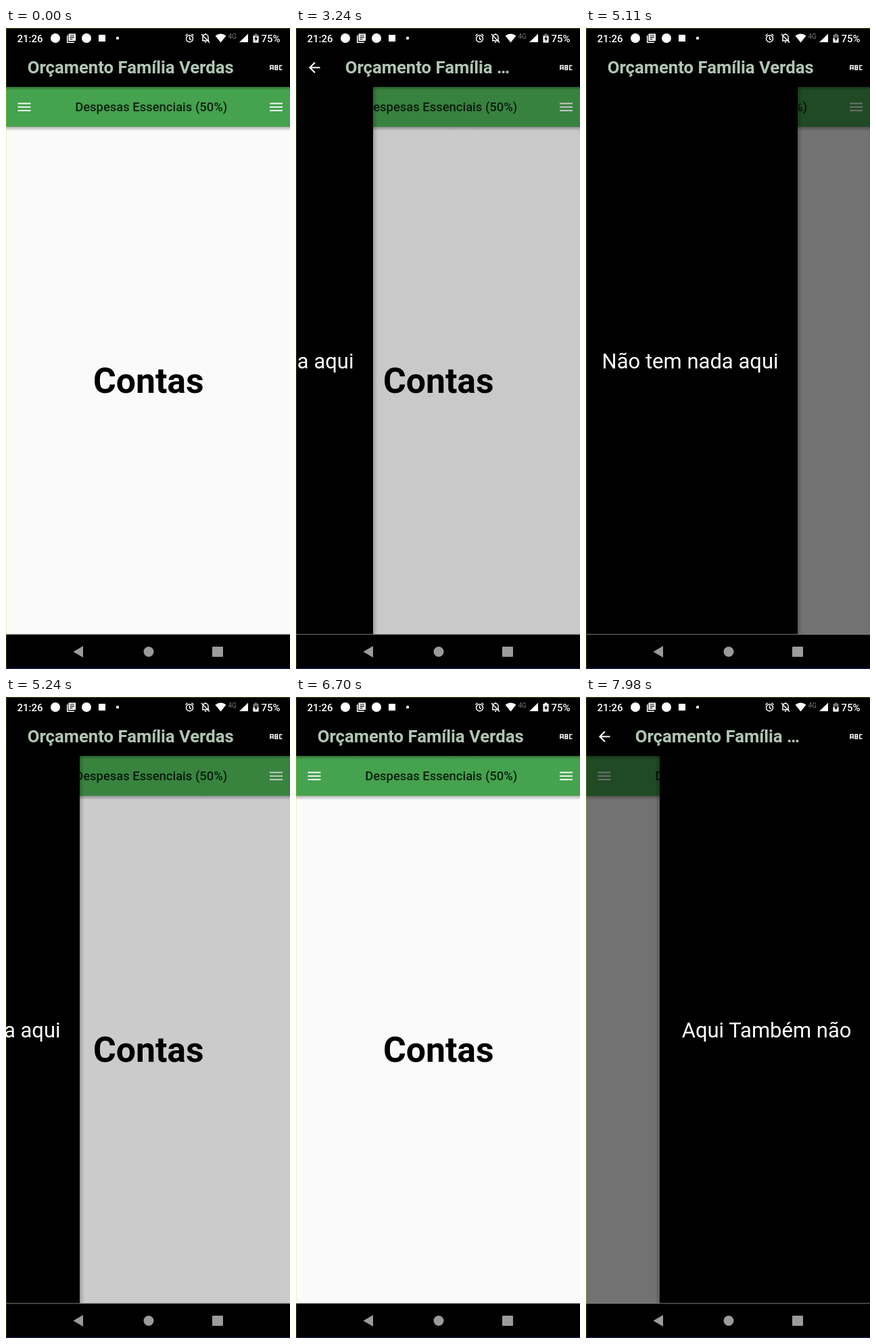
These frames come from a looping animation (420 px wide and 947 px high, 8000 ms). An HTML page:

```html
<!DOCTYPE html>
<html lang="pt">
<head>
<meta charset="utf-8">
<style>
  html, body { margin: 0; width: 100%; height: 100%; overflow: hidden; background: #000; }
  svg { display: block; width: 100%; height: 100%; font-family: Roboto, sans-serif; }
  .heading { font-size: 25.7px; font-weight: 700; fill: #b0c6b2; }
  .drawer { font-size: 31px; fill: #fff; }
  .status { font-size: 15px; font-weight: 500; }
  .line { fill: none; stroke: #fff; stroke-width: 1.5; }
</style>
</head>
<body>
<svg viewBox="0 0 420 947">
  <defs>
    <linearGradient id="down" x2="0" y2="1">
      <stop stop-opacity=".3"/><stop offset="1" stop-opacity="0"/>
    </linearGradient>
    <linearGradient id="right">
      <stop stop-opacity=".2"/><stop offset="1" stop-opacity="0"/>
    </linearGradient>
    <path id="menu" d="M0 0h19v2.1H0zM0 5.2h19v2.1H0zM0 10.4h19v2.1H0z" fill="#f1f8f1"/>
  </defs>

  <!-- page -->
  <rect y="87" width="420" height="809" fill="#fafafa"/>
  <rect y="146" width="420" height="6" fill="url(#down)"/>
  <rect y="87" width="420" height="59" fill="#45a24e"/>
  <rect y="87" width="420" height="5" fill="url(#down)"/>
  <use href="#menu" x="17.5" y="110.5"/>
  <use href="#menu" x="390" y="110.5"/>
  <text x="214.7" y="123" text-anchor="middle" font-size="18.4" font-weight="500" fill="#0c2010">Despesas Essenciais (50%)</text>
  <text x="210.8" y="538.5" text-anchor="middle" font-size="51.7" font-weight="700">Contas</text>
  <rect id="scrim" y="87" width="420" height="809"/>

  <!-- drawers -->
  <g id="leftDrawer">
    <rect y="87" width="313" height="809"/>
    <rect x="313" y="87" width="7" height="809" fill="url(#right)"/>
    <text class="drawer" x="23.6" y="502.7">Não tem nada aqui</text>
  </g>
  <g id="rightDrawer">
    <rect x="109" y="87" width="313" height="809"/>
    <rect y="87" width="7" height="809" fill="url(#right)" transform="translate(109) scale(-1 1)"/>
    <text class="drawer" x="141.7" y="502.7">Aqui Também não</text>
  </g>

  <!-- app bar -->
  <rect width="420" height="87"/>
  <text id="fullTitle" class="heading" x="31.7" y="67">Orçamento Família Verdas</text>
  <g id="shortTitle">
    <path transform="translate(14.8 46) scale(1.04)" fill="#fff" d="M20 11H7.83l5.59-5.59L12 4l-8 8 8 8 1.41-1.41L7.83 13H20z"/>
    <text class="heading" x="72.7" y="67">Orçamento Família …</text>
  </g>
  <path class="line" d="M390.9 62v-6.6h4.2V62m-4.2-2.8h4.2M398 55.4h3.5v6H398zm0 3h4M408.5 55.4h-3.7v6h3.7"/>

  <!-- status bar -->
  <g fill="#fff">
    <text class="status" x="16.5" y="21">21:26</text>
    <circle cx="73" cy="15" r="7"/>
    <path class="line" d="M90.7 11v10.3H101"/>
    <path d="M92.5 8.5h10.5v10.5H92.5z"/>
    <path d="M94.5 11h6.5m-6.5 2.7h6.5m-6.5 2.7h4" stroke="#000" stroke-width="1.2"/>
    <circle cx="119" cy="15" r="7"/>
    <rect x="137" y="10" width="10" height="10"/>
    <circle cx="165" cy="15" r="2.2"/>
    <path class="line" d="M266.5 15.7a5 5 0 1 0 10 0a5 5 0 1 0-10 0M271.5 12.5v3.5l2.3 1.5M265.5 11.5l3-2.7M277.5 11.5l-3-2.7"/>
    <path class="line" d="M290 18.7h10M291 18v-4.5a4 4 0 0 1 8 0V18M295 8v1.5M293.8 21h2.4M289 9l12 12.5"/>
    <path d="M309.5 11.5Q317.5 5.5 325.5 11.5L317.5 21.5z"/>
    <text x="328.5" y="16" font-size="10" fill="#777">4G</text>
    <path d="M358 8.5v12.5h-13z"/>
    <path d="M367.8 8.5h3.5v1.5h2.2v11.5h-8v-11.5h2.3z" fill="#777"/>
    <clipPath id="charge"><rect id="level" x="364" width="11" height="14"/></clipPath>
    <path d="M367.8 8.5h3.5v1.5h2.2v11.5h-8v-11.5h2.3z" clip-path="url(#charge)"/>
    <path d="M370.3 11.5l-3.3 5h2v3.5l3.2-5h-1.9z" fill="#000"/>
    <text class="status" x="377.5" y="21">75%</text>
  </g>

  <!-- navigation bar -->
  <rect y="896" width="420" height="51"/>
  <rect y="895.4" width="420" height="1" fill="#808080"/>
  <g fill="#9b9b9b">
    <path d="M114 913v17l-14.5-8.5z"/>
    <circle cx="211" cy="921.5" r="7.5"/>
    <rect x="305" y="914" width="16" height="15" rx="1"/>
  </g>

  <!-- screen edges -->
  <rect width="1" height="947" fill="#c8e600" opacity=".27"/>
  <rect width="420" height="1" fill="#46520c"/>
  <rect y="946" width="420" height="1" fill="#14225e"/>
</svg>
<script>
  const LOOP = 8000, STEP = 65, WIDTH = 313;
  const $ = id => document.getElementById(id);

  // Critically damped spring, stiffness 500: share of the way still to go.
  function remaining(ms) {
    const u = Math.sqrt(500) * Math.max(0, ms) / 1000;
    return (1 + u) * Math.exp(-u);
  }

  const stepped = (t, start) => Math.floor((t - start) / STEP) * STEP;

  function leftOpen(t) {
    if (t < 3240 || t >= 5630) return 0;
    if (t < 5110) return t >= 3630 ? 1 : 1 - remaining(stepped(t, 3240) + 57);
    return remaining(stepped(t, 5110) - 30.5);
  }

  function rightOpen(t) {
    if (t < 6910) return 0;
    return t >= 7240 ? 1 : 1 - remaining(stepped(t, 6910) + 75);
  }

  // Battery charge pulse: empty, half, full.
  const levelTops = [15, 12, 8];
  const pulses = [0, 700, 1700, 2640, 3630, 4630, 5630, 6700, 7640];

  function show(id, visible) {
    $(id).setAttribute("visibility", visible ? "visible" : "hidden");
  }

  function slide(id, open, direction) {
    show(id, open > 0);
    $(id).setAttribute("transform", `translate(${direction * WIDTH * (1 - open)})`);
  }

  function draw(now) {
    const t = now % LOOP;
    const left = leftOpen(t), right = rightOpen(t);
    slide("leftDrawer", left, -1);
    slide("rightDrawer", right, 1);
    $("scrim").setAttribute("opacity", 0.54 * Math.max(left, right));

    const drawerActive = (t >= 3240 && t < 5110) || t >= 6910;
    show("fullTitle", !drawerActive);
    show("shortTitle", drawerActive);

    const pulse = pulses.filter(p => p <= t).length;
    $("level").setAttribute("y", levelTops[pulse % 3]);
    requestAnimationFrame(draw);
  }
  requestAnimationFrame(draw);
</script>
</body>
</html>
```
